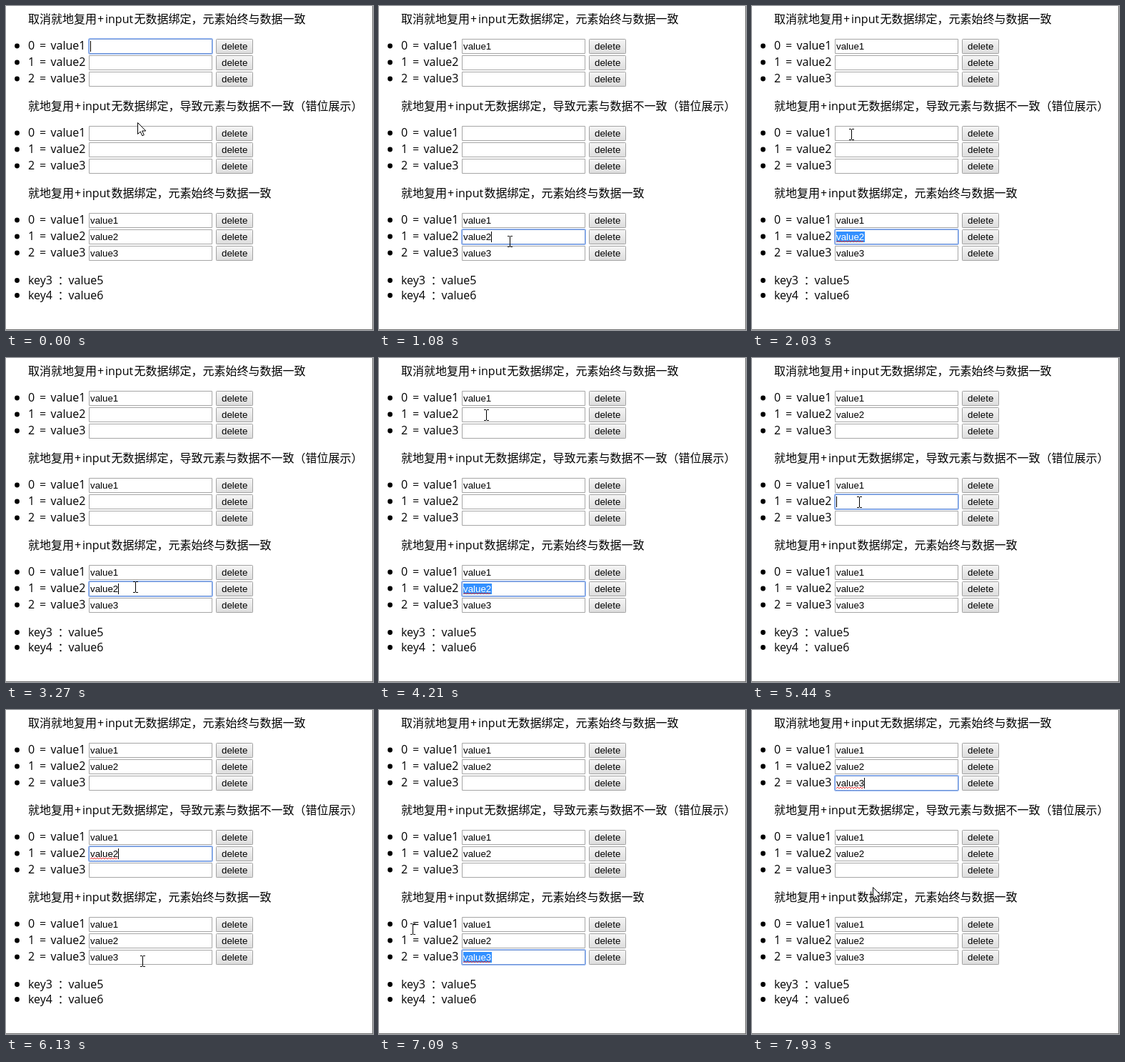
These frames come from a looping animation (514 px wide and 454 px high, 8000 ms). An HTML page with a canvas:

```html
<!DOCTYPE html>
<html lang="zh-CN">
<head>
<meta charset="utf-8">
<style>
html, body { margin: 0; width: 100%; height: 100%; overflow: hidden; background: #fff; }
canvas { display: block; }
</style>
</head>
<body>
<canvas id="stage" width="514" height="454"></canvas>
<script>
const c = document.getElementById('stage').getContext('2d');
const LABEL = '16px "Open Sans", "Noto Sans CJK SC", "Noto Sans CJK", sans-serif';
const FIELD = '13.333px "Liberation Sans", Arial, sans-serif';
const LOOP = 8000, MOUSE_STEP = 135, TEXT_LEFT = 118, TEXT_RIGHT = 157.5;

const stop = (arrive, leave, x, y, field = -1) =>
  ({ arrive, leave, x, y, field, press: (arrive + leave) / 2 });

// Mouse stops. A stop with a field (0-8, top to bottom) clicks it halfway through;
// on leaving, an empty field gets its text pasted and a bound field (6-8) is drag-selected.
const stops = [
  stop(-900, 120, 184, 163, 0),
  stop(940, 1140, 183, 330, 7),
  stop(1480, 1610, 26, 324),
  stop(2010, 2550, 139, 180, 3),
  stop(3110, 3270, 181, 321, 7),
  stop(3550, 3700, 31, 322),
  stop(4150, 4600, 150, 80, 1),
  stop(4860, 4900, 157, 260),
  stop(5140, 5740, 150, 202, 4),
  stop(5900, 5900, 195, 380),
  stop(6070, 6750, 191, 352, 8),
  stop(6890, 6950, 26, 348),
  stop(7360, 7650, 150, 108, 2),
  stop(7830, LOOP, 169, 248),
];
const clicks = stops.filter(s => s.field >= 0);
const pasteTime = i => clicks.find(s => s.field === i)?.leave ?? Infinity;

function mouseAt(t) {
  const i = stops.findLastIndex(s => s.arrive <= t);
  const a = stops[i], b = stops[i + 1] ?? a;
  const k = t <= a.leave ? 0 : (t - a.leave) / (b.arrive - a.leave);
  return { x: a.x + (b.x - a.x) * k, y: a.y + (b.y - a.y) * k };
}

function text(s, x, y, font = LABEL, color = '#000') {
  c.font = font;
  c.fillStyle = color;
  c.fillText(s, x, y);
}

function rect(x, y, w, h, color) {
  c.fillStyle = color;
  c.fillRect(x, y, w, h);
}

function frame(x, y, w, h, r, color) {
  c.strokeStyle = color;
  c.lineWidth = 1;
  c.beginPath();
  c.roundRect(x + .5, y + .5, w - 1, h - 1, r);
  c.stroke();
}

function bullet(y) {
  c.fillStyle = '#000';
  c.beginPath();
  c.arc(15.5, y, 3.4, 0, 7);
  c.fill();
}

function heading(before, after, y) {
  const x = 31 + before.length * 16;
  text(before, 31, y);
  text('+', x + 1, y);
  text('input', x + 12, y);
  text(after, x + 52.5, y);
}

function button(y) {
  const g = c.createLinearGradient(0, y, 0, y + 21);
  g.addColorStop(0, '#f6f6f6');
  g.addColorStop(1, '#dcdcdc');
  rect(294, y, 52, 21, g);
  frame(294, y, 52, 21, 1, '#a2a2a2');
  text('delete', 302, y + 15, FIELD);
}

function selection(value, left, y) {
  c.save();
  c.beginPath();
  c.rect(left, y + 3, TEXT_RIGHT + .5 - left, 15);
  c.clip();
  rect(left, y + 3, 41, 15, '#3390ff');
  text(value, TEXT_LEFT, y + 15, FIELD, '#fff');
  c.restore();
}

function squiggle(y) {
  c.strokeStyle = '#f03030';
  c.lineWidth = 1;
  c.beginPath();
  for (let x = TEXT_LEFT; x < TEXT_RIGHT; x += 2) c.lineTo(x, y + x % 4 - 1);
  c.stroke();
}

function field(i, y, t, mouse, click) {
  const focused = click.field === i, bound = i > 5;
  const filled = bound || t >= pasteTime(i);
  const value = 'value' + (i % 3 + 1);
  rect(116, y, 174, 21, '#fff');
  frame(116, y, 173, 21, 0, focused ? '#6d93d6' : '#a6a6a6');
  if (focused) frame(115, y - 1, 175, 23, 1.5, '#9dbcf4');
  if (filled) text(value, TEXT_LEFT, y + 15, FIELD);
  if (!focused) return;

  const dragEnd = stops[stops.indexOf(click) + 1].arrive;
  const left = t >= dragEnd ? TEXT_LEFT : Math.max(TEXT_LEFT, mouse.x);
  const selected = bound && left < TEXT_RIGHT;
  if (selected) selection(value, left, y);
  if (selected || filled && !bound) squiggle(y + 17);

  const since = filled && !bound ? click.leave : click.press;
  if (!selected && (t - since) % 1000 < 500)
    rect(filled ? 157 : TEXT_LEFT, y + 3, 1, 15, '#000');
}

function searchBadge() {
  c.globalAlpha = .9;
  c.fillStyle = '#f83c3c';
  c.beginPath();
  c.roundRect(141, 25, 38, 38, 5);
  c.fill();
  c.strokeStyle = '#fff';
  c.lineWidth = 2;
  c.beginPath();
  c.arc(158.5, 42.5, 8.5, 0, 7);
  c.moveTo(164.5, 48.5);
  c.lineTo(170.5, 54.5);
  c.stroke();
  c.globalAlpha = 1;
}

function pointer({ x, y }) {
  const d = (y - 8) % 122;
  const overText = y < 365 && (d < 22 || (d > 37 && d < 106 && x < 290));
  c.save();
  c.translate(Math.round(x), Math.round(y));
  if (overText) {
    rect(0, -7, 1, 14, '#000');
    for (const e of [-8, 7]) {
      rect(-3, e, 3, 1, '#000');
      rect(1, e, 3, 1, '#000');
    }
  } else {
    const arrow = new Path2D('M.5 .5V16.5L4.2 13L6.8 18.8L9.3 17.7L6.7 12H11.8Z');
    c.fillStyle = '#fff';
    c.fill(arrow);
    c.strokeStyle = '#000';
    c.lineWidth = 1;
    c.stroke(arrow);
  }
  c.restore();
}

function draw(t) {
  const mouse = mouseAt(Math.floor(t / MOUSE_STEP) * MOUSE_STEP);
  const click = clicks.findLast(s => s.press <= t);

  rect(0, 0, 514, 454, '#fff');
  heading('取消就地复用', '无数据绑定，元素始终与数据一致', 24);
  heading('就地复用', '无数据绑定，导致元素与数据不一致（错位展示）', 146);
  heading('就地复用', '数据绑定，元素始终与数据一致', 268);

  for (let i = 0; i < 9; i++) {
    const row = i % 3, y = 46 + Math.floor(i / 3) * 122 + row * 23;
    bullet(y + 10);
    text(row, 31, y + 15);
    text('=', 47, y + 15);
    text('value' + (row + 1), 62.5, y + 15);
    field(i, y, t, mouse, click);
    button(y);
  }
  for (const i of [0, 1]) {
    const y = 390 + i * 21;
    bullet(y - 5.5);
    text('key' + (3 + i), 31, y);
    text('：', 72.5, y);
    text('value' + (5 + i), 87.5, y);
  }

  rect(513, 0, 1, 454, '#6e6e6e');
  rect(0, 453, 514, 1, '#6e6e6e');
  if (t >= 4750 && t < 5160) searchBadge();
  pointer(mouse);
}

function loop() {
  draw(performance.now() % LOOP);
  requestAnimationFrame(loop);
}
loop();
</script>
</body>
</html>
```
